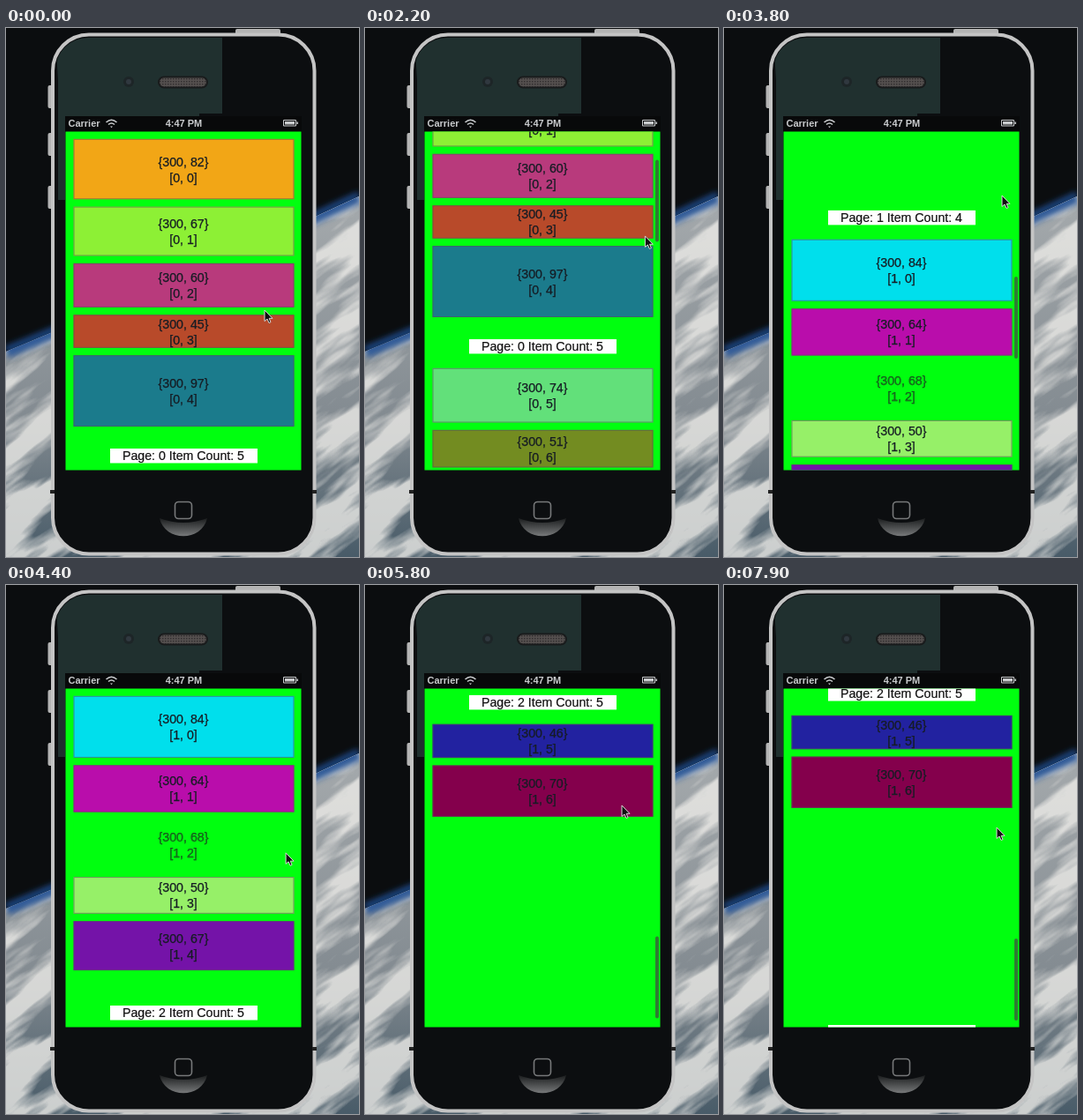
An HTML page that plays this animation: 400 px wide and 600 px high, repeating every 8 s.

```html
<!DOCTYPE html>
<html lang="en">
<head>
<meta charset="utf-8">
<title>Paged list on a phone</title>
<style>
  html, body { margin: 0; width: 100%; height: 100%; overflow: hidden; background: #0b0d0f; }
  svg { display: block; width: 400px; height: 600px; }
  text { font-family: "Liberation Sans", Arial, sans-serif; font-size: 14.2px; text-anchor: middle; }
  .status text { font-size: 11px; font-weight: bold; fill: #c9cbcd; }
</style>
</head>
<body>
<svg viewBox="0 0 400 600">
  <defs>
    <linearGradient id="ground" x1="0" y1="200" x2="0" y2="600" gradientUnits="userSpaceOnUse">
      <stop offset="0" stop-color="#a4a9ac"/>
      <stop offset=".6" stop-color="#838b91"/>
      <stop offset="1" stop-color="#485b68"/>
    </linearGradient>
    <linearGradient id="dish" x1="0" y1="0" x2="0" y2="1">
      <stop offset="0" stop-color="#1b1d1e"/>
      <stop offset="1" stop-color="#77797a"/>
    </linearGradient>
    <pattern id="mesh" width="3" height="3" patternUnits="userSpaceOnUse">
      <rect width="3" height="3" fill="#55504f"/>
      <rect width="1.5" height="1.5" fill="#332f30"/>
    </pattern>
    <filter id="haze" x="-10%" y="-20%" width="120%" height="140%"><feGaussianBlur stdDeviation="3"/></filter>
    <filter id="wisps" x="0" y="0" width="100%" height="100%">
      <feTurbulence type="fractalNoise" baseFrequency=".007 .035" numOctaves="4" seed="7"/>
      <feColorMatrix values="0 0 0 0 .85  0 0 0 0 .84  0 0 0 0 .81  5 0 0 0 -2"/>
    </filter>
    <clipPath id="globe"><path d="M0 367Q200 285 400 191V600H0Z"/></clipPath>
    <clipPath id="screen"><rect x="67.5" y="117.5" width="267" height="384"/></clipPath>
    <clipPath id="glass"><rect x="56" y="11" width="290" height="582" rx="37"/></clipPath>
  </defs>

  <rect width="400" height="600" fill="#0b0d0f"/>
  <path d="M0 365Q200 283 400 189" fill="none" stroke="#1d4480" stroke-width="8" filter="url(#haze)"/>
  <g clip-path="url(#globe)">
    <rect width="400" height="600" fill="url(#ground)"/>
    <rect x="-300" y="100" width="900" height="700" transform="rotate(-36 200 400)" filter="url(#wisps)" opacity=".8"/>
    <path d="M0 367Q200 285 400 191" fill="none" stroke="#315c98" stroke-width="16" filter="url(#haze)"/>
  </g>

  <g fill="#b4b4b4">
    <rect x="260" y="1" width="51" height="7" rx="2"/>
    <rect x="47.5" y="65" width="6" height="26" rx="2"/>
    <rect x="47.5" y="119" width="6" height="26" rx="2"/>
    <rect x="47.5" y="179" width="6" height="26" rx="2"/>
  </g>
  <rect x="53" y="7.5" width="296.500" height="589" rx="41" fill="#0c0e10" stroke="#c4c4c4" stroke-width="4"/>
  <path d="M50 526h5M347 526h5" stroke="#222" stroke-width="4"/>
  <path d="M56 11H245V97H219V100H67V195H59V60Z" fill="#20302f" clip-path="url(#glass)"/>
  <circle cx="139" cy="61" r="6" fill="#1d2527"/>
  <circle cx="139" cy="61" r="3" fill="#30383f"/>
  <rect x="173" y="55.500" width="55" height="12" rx="6" fill="url(#mesh)" stroke="#191b1c" stroke-width="2"/>
  <path d="M174 556Q201 566 228 556C222 583 180 583 174 556Z" fill="url(#dish)"/>
  <rect x="191.500" y="537.500" width="19" height="19" rx="4" fill="#0c0e10" stroke="#77797a" stroke-width="1.600"/>

  <g class="status">
    <rect x="67" y="100" width="268" height="18" fill="#08090a"/>
    <text x="88.500" y="112">Carrier</text>
    <text x="201.500" y="112">4:47 PM</text>
    <g fill="none" stroke="#c9cbcd" stroke-width="1.600">
      <path d="M113.500 107Q119.500 101.500 125.500 107M116 109.500Q119.500 106.500 123 109.500"/>
      <path d="M314.500 104.500h14v6.500h-14z" stroke-width="1"/>
    </g>
    <path d="M118 111.500h3l-1.500 1.700zM316 106h11v3.500h-11zM329.500 106.500h1.500v2.500h-1.500z" fill="#c9cbcd"/>
  </g>

  <rect x="67.500" y="117.500" width="267" height="384" fill="#00ff0f"/>
  <g clip-path="url(#screen)">
    <g id="list"></g>
    <rect id="bar" x="329" width="4" height="93" rx="2" fill="#444" fill-opacity=".7"/>
  </g>
  <path id="cursor" d="M0 0V12.500L3 10L5 14.500L7 13.600L5.200 9.300H9Z" fill="#111" stroke="#d8d8d8"/>
</svg>
<script>
  const SCALE = 0.8344, PAGE = 384, TOP = 117.5, GAP = 10, ROOM = 430, GREEN = '#00ff0f';
  // Height and colour of every item, by section
  const sections = [
    '82 #f2a616, 67 #8df035, 60 #b83a7c, 45 #b84a2a, 97 #1b7b8c, 74 #62e07a, 51 #738c21, 55 #40b350, 91 #a03a57',
    '84 #00dfec, 64 #b90dab, 68 #00ff0f, 50 #96f068, 67 #7413a8, 46 #2222a0, 70 #84004c'
  ];
  const $ = id => document.getElementById(id);

  function add(tag, attrs, content = '') {
    const el = document.createElementNS('http://www.w3.org/2000/svg', tag);
    for (const name in attrs) el.setAttribute(name, attrs[name]);
    el.textContent = content;
    $('list').append(el);
  }

  function addItem(y, size, fill, index) {
    const height = size * SCALE, mid = y + height / 2, blank = fill === GREEN;
    const ink = { x: 201, fill: blank ? '#18741c' : '#161c24', stroke: '#161c24', 'stroke-width': 0.25 };
    add('rect', { x: 76.5, y, width: 250, height, fill });
    if (!blank) add('rect', { x: 77, y: y + 0.5, width: 249, height: height - 1, fill: 'none', stroke: '#555', 'stroke-opacity': 0.6 });
    add('text', { ...ink, y: mid - 3.5 }, `{300, ${size}}`);
    add('text', { ...ink, y: mid + 14.5 }, `[${index}]`);
  }

  function addFooter(page, count) {
    const y = TOP + page * PAGE + 359.5;
    add('rect', { x: 118, y, width: 167, height: 16.5, fill: '#fff' });
    add('text', { x: 201, y: y + 13.2, fill: '#111', stroke: '#111', 'stroke-width': 0.2 }, `Page: ${page} Item Count: ${count}`);
  }

  // Items flow down a page; a full page or the end of a section starts the next
  let page = 0;
  sections.forEach((section, s) => {
    let used = GAP, count = 0;
    const turn = () => { addFooter(page++, count); used = GAP; count = 0; };
    section.split(', ').forEach((item, row) => {
      const [size, fill] = item.split(' ');
      if (used + +size + GAP > ROOM) turn();
      addItem(TOP + page * PAGE + used * SCALE, size, fill, `${s}, ${row}`);
      used += +size + GAP;
      count++;
    });
    turn();
  });

  const SWIPE = 790, FADE = 200;
  const swipes = [{ start: 1900, step: 1 }, { start: 3295, step: 1 }, { start: 5150, step: 1 }, { start: 7785, step: -1 }];
  // Pointer stops: ms, x, y
  const stops = [[0, 293, 320], [1700, 310, 378], [1900, 314, 430], [2300, 318, 200], [2900, 337, 475], [3300, 330, 462],
    [3800, 315, 190], [5150, 320, 463], [5300, 319, 425], [5800, 291, 250], [7785, 309, 253], [7900, 309, 275], [8000, 309, 300]];

  const clamp = u => Math.min(1, Math.max(0, u));
  const ease = u => (u = clamp(u), u * u * (3 - 2 * u));

  function pointer(t) {
    const i = stops.findIndex(stop => stop[0] > t);
    const [from, x, y] = stops[i - 1], [to, x2, y2] = stops[i];
    const u = ease((t - from) / (to - from));
    return [x + (x2 - x) * u, y + (y2 - y) * u];
  }

  function draw(now) {
    const t = Math.floor(now % 8000 / 100) * 100;
    let offset = 0, glow = 0;
    for (const { start, step } of swipes) {
      const age = t - start;
      offset += step * PAGE * ease(age / SWIPE);
      glow = Math.max(glow, Math.min(clamp(age / 100), clamp((SWIPE + FADE - age) / FADE)));
    }
    $('list').setAttribute('transform', `translate(0 ${-offset})`);
    $('bar').setAttribute('y', 118.5 + offset / 4);
    $('bar').setAttribute('opacity', glow);
    $('cursor').setAttribute('transform', `translate(${pointer(t)})`);
    requestAnimationFrame(draw);
  }
  draw(performance.now());
</script>
</body>
</html>
```
